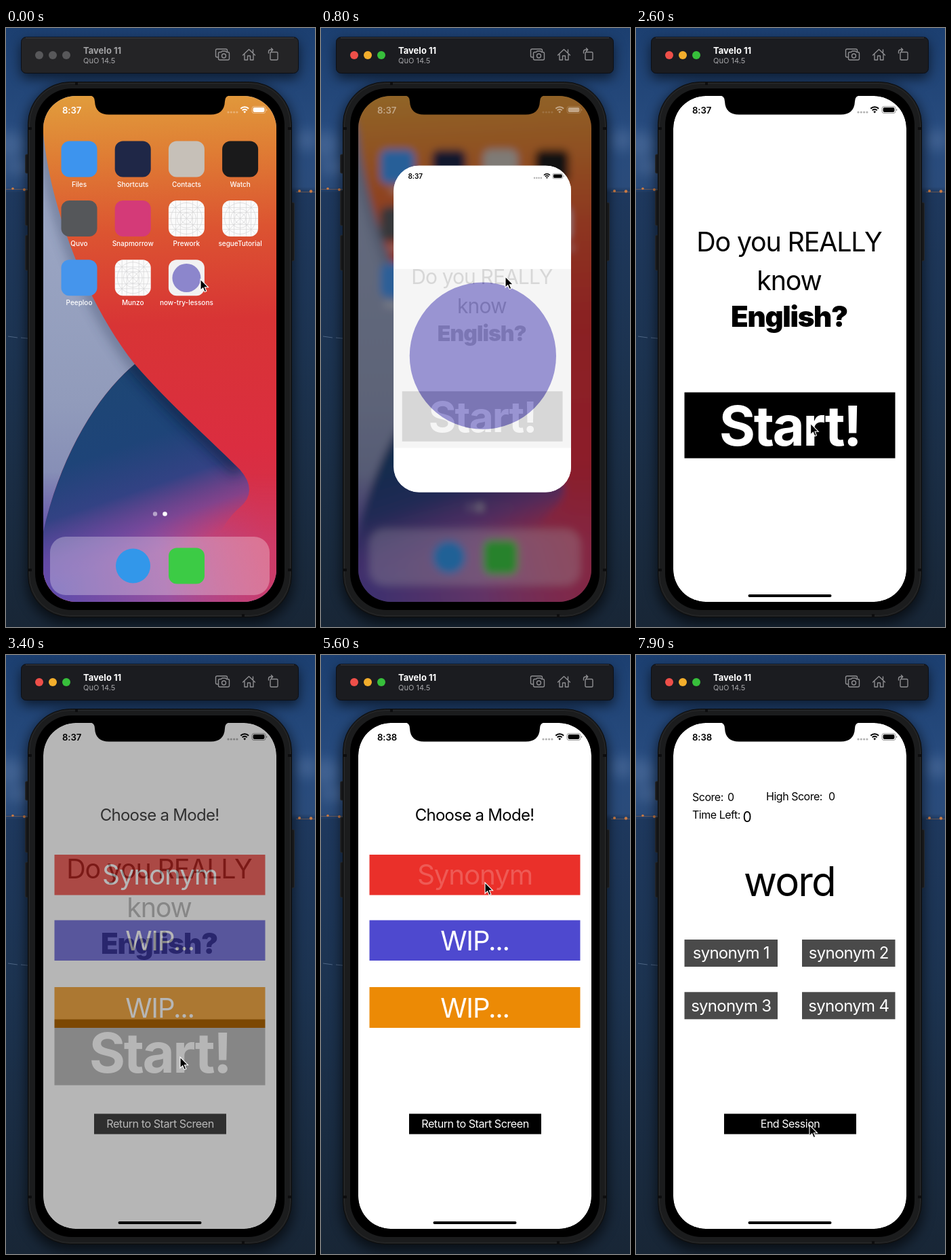
An HTML page for the animation above (8 s loop, 456x882 px).

```html
<!DOCTYPE html>
<html lang="en">
<head>
<meta charset="utf-8">
<title>Word game demo</title>
<style>
  html, body { margin: 0; width: 100%; height: 100%; overflow: hidden; background: #1c2c42; }
  svg { display: block; width: 456px; height: 882px; }
  text { font-family: Inter, Roboto, "Liberation Sans", sans-serif; letter-spacing: -.03em; }
  .label, .bar { letter-spacing: 0; }
  .label { font-size: 10px; font-weight: 500; fill: #fff; }
  .time { letter-spacing: -.01em; font-size: 13.2px; font-weight: 600; }
  .mid { text-anchor: middle; }
</style>
</head>
<body>
<svg viewBox="0 0 456 882" xmlns="http://www.w3.org/2000/svg">
  <defs>
    <linearGradient id="sky" x2="0" y2="1">
      <stop offset="0" stop-color="#1c3f70"/><stop offset=".17" stop-color="#274b7e"/>
      <stop offset=".265" stop-color="#2a4b7a"/><stop offset=".275" stop-color="#1e385d"/>
      <stop offset=".55" stop-color="#1c3350"/><stop offset="1" stop-color="#182636"/>
    </linearGradient>
    <linearGradient id="lilac" x2="0" y2="1">
      <stop offset="0" stop-color="#a2aec9"/><stop offset=".6" stop-color="#919bbb"/><stop offset="1" stop-color="#7074ac"/>
    </linearGradient>
    <linearGradient id="warm" gradientUnits="userSpaceOnUse" x1="210" y1="95" x2="250" y2="850">
      <stop offset="0" stop-color="#e19c3c"/><stop offset=".12" stop-color="#df7d34"/>
      <stop offset=".27" stop-color="#dc5431"/><stop offset=".45" stop-color="#d83435"/>
      <stop offset=".7" stop-color="#db2d40"/><stop offset="1" stop-color="#c93558"/>
    </linearGradient>
    <linearGradient id="navy" gradientUnits="userSpaceOnUse" x1="190" y1="495" x2="290" y2="790">
      <stop offset="0" stop-color="#1d4674"/><stop offset=".35" stop-color="#1e4478"/>
      <stop offset=".57" stop-color="#334284"/><stop offset=".74" stop-color="#6248a0" stop-opacity=".7"/>
      <stop offset=".88" stop-color="#7a4aa8" stop-opacity="0"/>
    </linearGradient>
    <linearGradient id="violet" gradientUnits="userSpaceOnUse" x1="70" y1="800" x2="385" y2="745">
      <stop offset="0" stop-color="#604cab"/><stop offset=".5" stop-color="#98509f"/><stop offset="1" stop-color="#cc4684" stop-opacity=".45"/>
    </linearGradient>
    <linearGradient id="fade" x2="0" y2="1">
      <stop offset="0" stop-color="#000"/><stop offset=".45" stop-color="#fff"/>
    </linearGradient>
    <mask id="lowFade"><rect x="20" y="655" width="420" height="230" fill="url(#fade)"/></mask>
    <filter id="soft" x="-20%" y="-20%" width="140%" height="140%"><feGaussianBlur stdDeviation="9"/></filter>
    <filter id="homeBlur" filterUnits="userSpaceOnUse" x="0" y="50" width="456" height="832">
      <feGaussianBlur id="blurAmount" stdDeviation="0"/>
    </filter>
    <clipPath id="screen"><rect x="55" y="100" width="344" height="745" rx="48"/></clipPath>
    <clipPath id="window"><rect id="windowRect"/></clipPath>
    <path id="wave" d="M55 742C80 630 135 540 190 495C240 553 300 605 345 650Q373 682 345 706Q310 735 300 800L20 860z"/>
    <path id="ridge" d="M30 60L55 155C65 260 115 400 190 495C240 553 300 605 345 650"/>
    <clipPath id="waveClip"><use href="#wave"/></clipPath>
    <g id="statusIcons">
      <g opacity=".3"><circle cx="328" cy="124" r="1.6"/><circle cx="332.3" cy="124" r="1.6"/><circle cx="336.6" cy="124" r="1.6"/><circle cx="340.9" cy="124" r="1.6"/></g>
      <g fill="none" stroke="currentColor" stroke-width="2">
        <path d="M346.3 118.7a8.2 8.2 0 0 1 11.8 0M348.7 121.3a5 5 0 0 1 7 0"/>
      </g>
      <path d="M350.3 123.2a2.8 2.8 0 0 1 3.8 0l-1.9 2.2z"/>
      <rect x="363" y="115.5" width="20" height="10" rx="3" fill="none" stroke="currentColor" opacity=".4"/>
      <rect x="364.6" y="117.1" width="16.8" height="6.8" rx="1.8"/><path d="M384.2 119v3q1.2-.5 1.2-1.5t-1.2-1.5z" opacity=".5"/>
    </g>
    <g id="blueprint" fill="none" stroke="#cfcfd1" stroke-width=".6">
      <rect x="-26.5" y="-26.5" width="53" height="53" rx="12" fill="#fbfbfb" stroke="none"/>
      <path d="M-26.5 0h53M0-26.5v53M-26.5-9h53M-26.5 9h53M-9-26.5v53M9-26.5v53M-16-26.5v53M16-26.5v53M-26.5-16h53M-26.5 16h53M-23-23L23 23M-23 23L23-23"/>
      <circle r="8"/><circle r="14"/><circle r="23"/>
    </g>
  </defs>

  <rect width="456" height="882" fill="url(#sky)"/>
  <g filter="url(#soft)" fill="#7793bd" opacity=".3">
    <ellipse cx="6" cy="172" rx="22" ry="20"/><ellipse cx="444" cy="165" rx="16" ry="16"/><ellipse cx="20" cy="205" rx="24" ry="10"/>
  </g>
  <g fill="#c87a45">
    <circle cx="10" cy="236.5" r="1.8"/><circle cx="27" cy="238" r="2"/><circle cx="433" cy="240" r="2"/><circle cx="450" cy="240.5" r="2.2"/>
    <path d="M0 237h32v1H0zM428 241h28v1h-28z" opacity=".4"/>
  </g>
  <path d="M3 454l14 2M22 456l10 1" stroke="#7187a6" opacity=".6"/>
  <g filter="url(#soft)" opacity=".6">
    <rect x="30" y="85" width="394" height="792" rx="62"/><rect x="22" y="20" width="410" height="54" rx="8"/>
  </g>

  <g id="toolbar">
    <rect id="barFill" x="22.5" y="13.5" width="409" height="53" rx="7" stroke="#0c0f16"/>
    <path d="M29 14.5h396" stroke="#48484c" stroke-width=".8"/>
    <circle class="light" cx="49" cy="40" r="6"/><circle class="light" cx="69" cy="40" r="6"/><circle class="light" cx="89" cy="40" r="6"/>
    <text id="device" class="bar" x="114" y="38" font-size="13" font-weight="700">Tavelo 11</text>
    <text class="bar" x="114" y="52" font-size="11" fill="#a5a5a8">QuO 14.5</text>
    <g fill="none" stroke="#8e8e91" stroke-width="1.4" stroke-linejoin="round" stroke-linecap="round">
      <path d="M313 43h-1.500q-2 0-2-2v-8q0-2 2-2h13q2 0 2 2v1M315.500 35.500h2l1.500-1.500h5l1.500 1.500h2q2 0 2 2v7.500q0 2-2 2h-12q-2 0-2-2v-7.500q0-2 2-2z"/>
      <circle cx="321.500" cy="41" r="3"/>
      <path d="M349.500 40l9-8.500 9 8.500M352 38.500v8.500h4.500v-6h4v6h4.500v-8.500M364.500 36v-4"/>
      <rect x="390" y="35.500" width="11" height="11.500" rx="1.500"/><path d="M387.500 37v-2q0-3 3-3h3M391.500 29.700l2.300 2.300-2.300 2.300"/>
    </g>
  </g>

  <g fill="#17181a" stroke="#2a2b2d" stroke-width=".8">
    <rect x="28.500" y="186" width="6" height="28" rx="2"/><rect x="28.500" y="239" width="6" height="52" rx="2"/>
    <rect x="28.500" y="305" width="6" height="52" rx="2"/><rect x="420" y="257" width="5.500" height="86" rx="2"/>
  </g>
  <rect x="32.500" y="79.500" width="389" height="788" rx="62" fill="#1b1c1d" stroke="#0c0d0e"/>
  <rect x="34.500" y="81.500" width="385" height="784" rx="60" fill="none" stroke="#292a2b"/>
  <path d="M104 79v5M350 863v5M33 148h5M416 148h5M33 798h5M416 798h5" stroke="#0d0d0e" stroke-width="4"/>
  <rect x="43" y="89" width="368" height="768" rx="54"/>

  <g clip-path="url(#screen)">
    <rect x="55" y="100" width="344" height="745"/>
    <g id="home">
      <g id="homeArt">
        <rect x="20" y="60" width="420" height="820" fill="url(#lilac)"/>
        <use href="#ridge" fill="none" stroke="#283050" stroke-width="16" opacity=".4" filter="url(#soft)"/>
        <path d="M30 60L55 155C65 260 115 400 190 495C135 540 80 630 55 742L20 880H440V60z" fill="url(#warm)"/>
        <rect x="20" y="655" width="420" height="230" fill="url(#violet)" mask="url(#lowFade)"/>
        <use href="#wave" fill="url(#navy)"/>
        <g clip-path="url(#waveClip)">
          <use href="#ridge" fill="none" stroke="#101c3c" stroke-width="24" opacity=".6" filter="url(#soft)"/>
        </g>
        <g id="icons">
          <rect x="65" y="749" width="324" height="86" rx="23" fill="#fff" opacity=".29"/>
          <circle cx="220" cy="715.500" r="3.200" fill="#fff" opacity=".5"/><circle cx="234.500" cy="715.500" r="3.300" fill="#fff"/>
        </g>
      </g>
      <rect id="dim" x="55" y="100" width="344" height="745" opacity="0"/>
      <g id="homeStatus" fill="#fff" color="#fff">
        <text class="time" x="83" y="125.500">8:37</text><use href="#statusIcons"/>
      </g>
    </g>
    <g id="app" clip-path="url(#window)">
      <g id="appContent">
        <g id="start"></g>
        <g id="modes"></g>
        <g id="quiz"></g>
        <g id="splash">
          <rect x="55" y="100" width="344" height="745" fill="#fff"/><rect x="55" y="300" width="344" height="346" fill="#f4f4f4"/>
          <circle cx="228" cy="468" r="142" fill="#8c86cc"/>
        </g>
        <text id="clock" class="time" x="83" y="125.500"></text>
        <use href="#statusIcons" color="#000"/>
        <rect id="indicator" x="165.500" y="834" width="123" height="4" rx="2"/>
      </g>
    </g>
  </g>
  <path d="M122 99H332Q323 99.500 323 108Q322 127.500 302 127.500H152Q132 127.500 131 108Q131 99.500 122 99z"/>

  <path id="cursor" d="M0 0V16.200L3.700 12.800L6.200 18.600L8.800 17.500L6.400 11.800H11.600z" stroke="#fff" stroke-width="1.100"/>
</svg>

<script>
const LOOP = 8000;
const $ = id => document.getElementById(id);
const clamp = x => Math.max(0, Math.min(1, x));
const ramp = (t, from, to) => clamp((t - from) / (to - from));
const smooth = u => u * u * (3 - 2 * u);
const mix = (a, b, u) => a + (b - a) * u;
const set = (el, attrs) => { for (const k in attrs) el.setAttribute(k, attrs[k]); };

function add(parent, tag, attrs, content = '') {
  const el = document.createElementNS('http://www.w3.org/2000/svg', tag);
  set(el, attrs);
  el.textContent = content;
  return parent.appendChild(el);
}

const label = (parent, x, y, size, content, more = {}) =>
  add(parent, 'text', { x, y, 'font-size': size, ...more }, content);
const centered = (parent, x, y, size, content, more) =>
  label(parent, x, y, size, content, { class: 'mid', ...more });

function button(parent, x, y, width, height, fill, size, baseline, content, more) {
  add(parent, 'rect', { x, y, width, height, fill });
  return centered(parent, x + width / 2, baseline, size, content, { fill: '#fff', ...more });
}

function buildHome() {
  const tile = (x, y, fill) =>
    add($('icons'), 'rect', { x: x - 26.5, y: y - 26.5, width: 53, height: 53, rx: 12, fill });
  const apps = [
    ['Files', '#3d94ee'], ['Shortcuts', '#1f2747'], ['Contacts', '#c6c0b8'], ['Watch', '#1a1a1b'],
    ['Quvo', '#55575a'], ['Snapmorrow', '#d43a78'], ['Prework'], ['segueTutorial'],
    ['Peeploo', '#4595ec'], ['Munzo'], ['now-try-lessons', '#f1f1f2'],
  ];
  apps.forEach(([name, color], i) => {
    const x = 108 + 79.2 * (i % 4), y = 193 + 87.4 * Math.floor(i / 4);
    if (color) tile(x, y, color);
    else add($('icons'), 'use', { href: '#blueprint', x, y });
    add($('icons'), 'text', { x, y: y + 40.5, class: 'label mid' }, name);
  });
  add($('icons'), 'circle', { cx: 266.4, cy: 368, r: 21, fill: '#8c86cc' });
  add($('icons'), 'circle', { cx: 187.5, cy: 792, r: 25.5, fill: '#3297ea' });
  tile(266.5, 792, '#3ccb45');
}

function buildScreens() {
  const [start, modes, quiz] = ['start', 'modes', 'quiz'].map($);
  for (const s of [start, modes, quiz])
    add(s, 'rect', { x: 55, y: 100, width: 344, height: 745, fill: '#fff' });

  centered(start, 226, 329, 39.4, 'Do you REALLY');
  centered(start, 226, 386, 39.4, 'know');
  centered(start, 226, 440, 42, 'English?', { 'font-weight': 900 });
  const startText = button(start, 71.5, 536.5, 311, 97, '#000', 81.5, 615, 'Start!', { 'font-weight': 700 });

  centered(modes, 226.5, 244, 24, 'Choose a Mode!');
  const synonymText = button(modes, 71.5, 294, 311, 59.5, '#ea302a', 40.5, 338, 'Synonym');
  button(modes, 71.5, 390.5, 311, 59.5, '#4e49cf', 40, 435, 'WIP...');
  button(modes, 71.5, 489, 311, 60, '#ec8a05', 40, 534, 'WIP...');
  button(modes, 130, 675.5, 195, 30, '#000', 16.2, 696, 'Return to Start Screen');

  label(quiz, 83, 215, 16, 'Score:');
  label(quiz, 135, 215, 16, '0');
  label(quiz, 192, 214, 16, 'High Score:');
  label(quiz, 284, 214, 16, '0');
  label(quiz, 83, 241, 16, 'Time Left:');
  label(quiz, 157.5, 246, 21, '0');
  centered(quiz, 226.5, 355, 60, 'word');
  for (let i = 0; i < 4; i++) {
    const row = i >> 1;
    button(quiz, i % 2 ? 245 : 71.5, 419 + 77.3 * row, 137.5, 40, '#4a4a4a', 24, 447.3 + 77.3 * row, 'synonym ' + (i + 1));
  }
  button(quiz, 130, 675.5, 195, 30, '#000', 16, 696, 'End Session');
  return { startText, synonymText };
}

buildHome();
const { startText, synonymText } = buildScreens();
const lights = [...document.querySelectorAll('.light')];

// Each move: start time, end time, destination.
const moves = [[100, 400, 272, 366], [1900, 2700, 257, 592], [3900, 5000, 242, 335], [5650, 6300, 256, 692]];

function drawCursor(t) {
  let x = 287, y = 370;
  for (const [from, to, endX, endY] of moves) {
    const u = smooth(ramp(t, from, to));
    x = mix(x, endX, u);
    y = mix(y, endY, u);
  }
  $('cursor').setAttribute('transform', `translate(${x} ${y})`);
}

function drawToolbar(active) {
  const colors = active ? ['#ee4f49', '#f3ae2c', '#37bf3b'] : Array(3).fill('#58585a');
  lights.forEach((el, i) => el.setAttribute('fill', colors[i]));
  $('barFill').setAttribute('fill', active ? '#1b1c20' : '#242426');
  $('device').setAttribute('fill', active ? '#fff' : '#a2a2a4');
}

function drawLaunch(t) {
  const p = 1 - (1 - ramp(t, 560, 1260)) ** 3;
  const grow = p ** 1.45;
  const width = mix(53, 344, p), height = mix(53, 745, grow);
  const x = mix(266.4, 227, p) - width / 2, y = mix(368, 472.5, p) - height / 2;
  const scale = width / 344;
  set($('windowRect'), { x, y, width, height, rx: mix(12, 48, p) });
  $('appContent').setAttribute('transform', `translate(${x} ${y}) scale(${scale}) translate(-55 -100)`);
  set($('app'), { opacity: ramp(t, 560, 660), visibility: t < 560 ? 'hidden' : 'visible' });

  const q = ramp(t, 560, 800);
  $('home').setAttribute('visibility', p < 1 ? 'visible' : 'hidden');
  if (q > 0 && p < 1) $('homeArt').setAttribute('filter', 'url(#homeBlur)');
  else $('homeArt').removeAttribute('filter');
  $('blurAmount').setAttribute('stdDeviation', 6 * q);
  $('dim').setAttribute('opacity', .36 * q);
  $('homeStatus').setAttribute('opacity', 1 - .55 * q);
  const s = 1 - .04 * q;
  $('icons').setAttribute('transform', `translate(227 472) scale(${s}) translate(-227 -472)`);
  $('splash').setAttribute('opacity', 1 - ramp(t, 770, 1030));
  $('indicator').setAttribute('opacity', ramp(t, 1000, 1150));
}

// The old screen fades out over black while the new one fades in above it.
function drawScreens(t) {
  const toModes = ramp(t, 3180, 3600), toQuiz = ramp(t, 5620, 6010);
  const leaving = p => clamp(1 - 1.15 * p);
  $('start').setAttribute('opacity', leaving(toModes));
  $('modes').setAttribute('opacity', toModes * leaving(toQuiz));
  $('quiz').setAttribute('opacity', toQuiz);
  const pressed = (from, to) => t >= from && t < to ? .2 : mix(.2, 1, t < from ? 1 : ramp(t, to, to + 200));
  startText.setAttribute('opacity', pressed(2950, 3150));
  synonymText.setAttribute('opacity', pressed(5400, 5620));
  $('clock').textContent = t < 4500 ? '8:37' : '8:38';
}

function draw(t) {
  drawToolbar(t >= 300);
  drawLaunch(t);
  drawScreens(t);
  drawCursor(t);
}

const began = performance.now();
function tick() {
  draw((performance.now() - began) % LOOP);
  requestAnimationFrame(tick);
}
draw(0);
requestAnimationFrame(tick);
</script>
</body>
</html>
```
